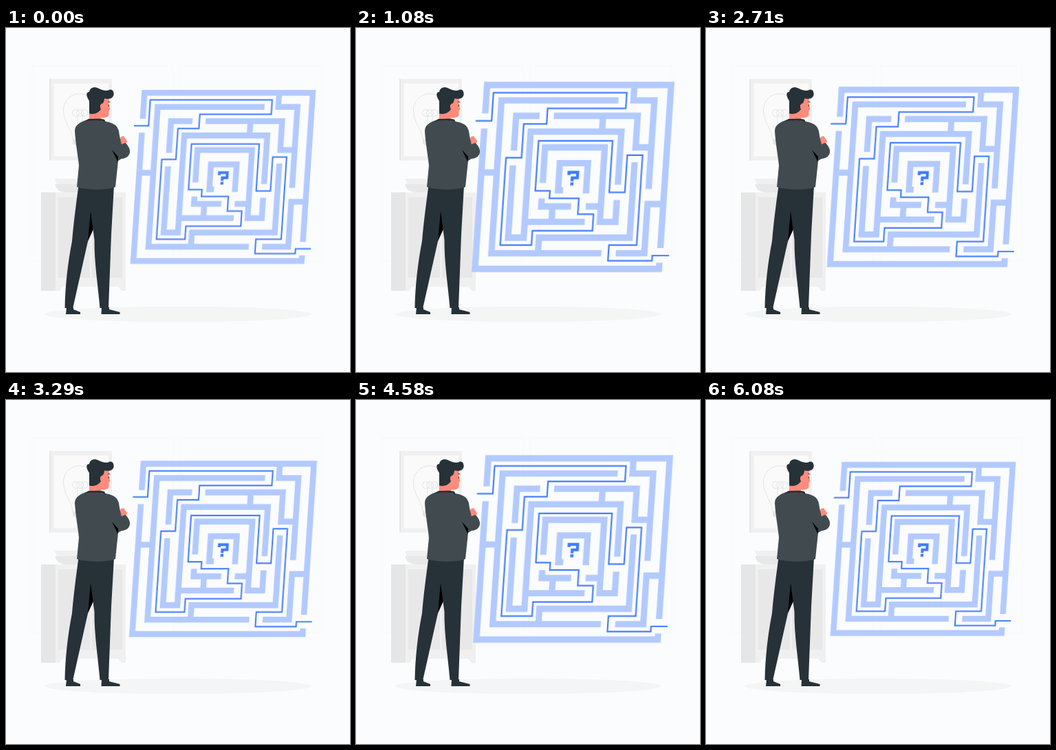
Write an HTML page without scripts that moves like this. It is 500 by 500 pixels and loops after 6.12 s.

```html
<!DOCTYPE html>
<html lang="en">
<head>
<meta charset="utf-8">
<title>Man looking at a maze</title>
<style>
  html, body { margin: 0; width: 100%; height: 100%; overflow: hidden; background: #fafcfe; }
  svg { display: block; width: 100vw; height: 100vh; }
  .pulse { transform-origin: 315.5px 216.5px; animation: pulse 6120ms linear infinite; }
  @keyframes pulse {
    0% { transform: scale(1); }
    18.87% { transform: scale(1.1); }
    58.9%, 59.97% { transform: scale(1); }
    79.17% { transform: scale(1.1); }
    85.78% { transform: scale(1.0655); }
    92.65% { transform: scale(1.0305); }
    99.2%, 100% { transform: scale(1); }
  }
  .walls { fill: none; stroke: #b3caff; stroke-width: 8.5; }
  .route { fill: none; stroke: #407bff; stroke-width: 2; }
  .mark { fill: none; stroke: #407bff; stroke-width: 4; }
  .dark { fill: #263238; }
  .skin { fill: #ff8b7b; }
  .coat { fill: #414b4f; }
</style>
</head>
<body>
<svg viewBox="0 0 500 500">
  <!-- room -->
  <g fill="#fbfcfd" stroke="#f6f8fa" stroke-width=".8">
    <rect x="38" y="55" width="205" height="283"/>
    <rect x="253" y="55" width="206" height="283"/>
  </g>
  <ellipse cx="250" cy="416" rx="194" ry="11.3" fill="#f4f5f5"/>

  <!-- picture -->
  <path d="M63 74H154V192.500H63Z" fill="#f0f0f0"/>
  <path d="M63 74h2v118.500h-2Z" fill="#e6e6e6"/>
  <path d="M69.500 80.500H149V186.500H69.500Z" fill="#fafafa"/>
  <g fill="none" stroke="#e4e4e4">
    <path d="M97 162C96 147 83.500 138 83.500 119A23.500 23.500 0 0 1 130.500 119C130.500 138 117 147 116 162Z"/>
    <circle cx="101.500" cy="123.500" r="5"/>
    <circle cx="107.500" cy="123.500" r="5"/>
    <circle cx="114" cy="123.500" r="5"/>
    <path d="M104 128V162M111 128V162"/>
  </g>
  <path d="M97 162H117V168L112 171H101L97 168Z" fill="#e6e6e6"/>

  <!-- cabinet -->
  <path d="M71 219H140V227H74Z" fill="#f0f0f0"/>
  <path d="M71.500 227H140C138 235 130 239 122 239H88C78 239 72 234 71.500 227Z" fill="#e8e8e8"/>
  <path d="M51 239H79V376L77 382H51Z" fill="#e6e6e6"/>
  <path d="M72 239H174V382H168L163 376H82L78 382H72Z" fill="#f0f0f0"/>
  <path d="M76 246H122V363H76ZM125 246H169V363H125Z" fill="#e8e8e8"/>

  <!-- maze -->
  <g class="pulse">
    <g transform="translate(315.5 216.5) skewX(-3.8) translate(-315.5 -216.5)">
      <path class="walls" d="
        M193.200 132V94.200H437.800V311
        M193.200 152V338.700H437.800V330.500
        M193.200 210.500H213.700
        M369 114.700H213.700V318H359.700
        M389 94.200V114.700H416.900V232.500
        M379 318H416.900V252.500H437.800
        M284.600 135.300H396V177.200H416.900
        M350 135.300V156.200
        M275.500 318V297.200H396V197
        M234.500 181.500V135.300H265.600
        M234.500 201V297.200H255.200V156.200H375.700V227
        M255.200 276.200H335
        M275.800 245V255.700H315.400
        M290.800 255.700V276.200
        M275.700 224.500V177.200H355V276.200H375.700V247
        M335 255.700H355
        M303.500 234.300H296.700V198.200H334V238.500"/>
      <path class="route" d="M181 142H202.300V104.500H379.500V125.500H275.700V146H245.300V191
        H224.700V307H266.200V288H346V266H325.100V245H286V235H266.500V168.500H364.900
        V237H385.700V187.500H406V307H369.200V328H427.700V321H450"/>
      <path class="mark" d="M309.800 214V210.300H321.300V217.700H314.500V222.300M312.400 225.700H316.600"/>
    </g>
  </g>

  <!-- man -->
  <path class="dark" d="M88 406H98V409L108 413V416H87ZM139 406H150V409L165.500 413V416H138.500Z"/>
  <path d="M121 258L118 312L130 286Z"/>
  <path class="dark" d="M105.500 229L157 229L153 300L149 406.500L136.500 407
    C134 376 128 340 128.500 308L123 266L119 310L97 408L85.500 407C86 375 90 340 96 310C98 285 102 255 105.500 229Z"/>
  <path class="skin" d="M136 102H150L149.200 109L151.500 118L149.500 120V126C149 130 143 131 138 130.500L137 136H121V122Z"/>
  <path class="dark" d="M121 124.500V106C116 98 116 93.500 121 93C122 86 129 84.500 135 88C141 91 147 92 150 90
    C155 88 158 94 156 99C153 104 147 103 143 102.500C143 106 141 109 140 111
    C137 110 136 114 138 118C134 124 128 126 121 124.500Z"/>
  <path class="skin" d="M144 111C141 108 137 110 137 114C137 118 140 120 143 117Z"/>
  <path d="M148 107L151.500 108M149.300 111.500v2.500" fill="none" stroke="#263238"/>
  <path class="skin" d="M165 164L167 158L171 157L173 160L176 164L175 168L170 171Z"/>
  <path class="coat" d="M119 133C107 137 100 141 100 150C101 167 105 188 106 200L103 231
    C118 236 148 236 159 231L163 193L168 190C175 190 181 185 180 178
    C179 172 175 168 173 167L168 169C166 162 165 157 164 150C162 142 157 138 145 136Z"/>
  <path class="dark" d="M114 136L120 132C128 132 138 131 143 133L145 137C135 134 124 134 114 136Z"/>
  <path d="M154 177L163 187L162.500 194.500Z"/>
</svg>
</body>
</html>
```
